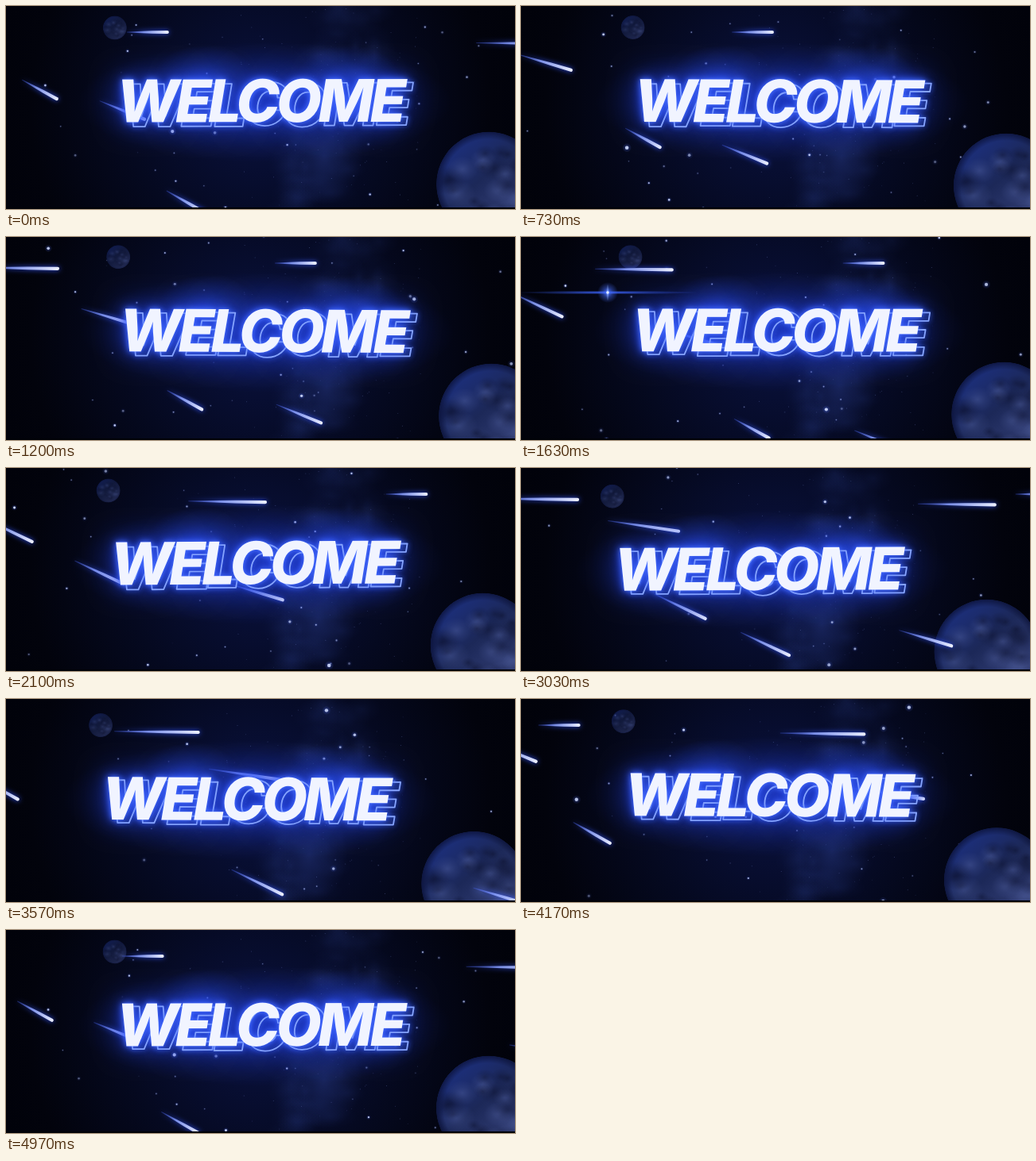
These frames come from a looping animation (640x256 px, 5.01 s). An HTML page with a canvas:

```html
<!DOCTYPE html>
<html lang="en">
<head>
<meta charset="utf-8">
<title>Welcome</title>
<style>
  html, body { margin: 0; width: 100%; height: 100%; overflow: hidden; background: #01020a; }
  canvas { display: block; width: 640px; height: 256px; }
</style>
</head>
<body>
<canvas id="stage" width="640" height="256"></canvas>
<script>
const ctx = document.getElementById('stage').getContext('2d');
const W = 640, H = 256, CX = 320, CY = 128, LOOP = 5.01;
const { sin, cos, min, max, sqrt, exp, floor, PI } = Math;

function seeded(seed) {
  return () => {
    seed = (seed + 0x6D2B79F5) | 0;
    let n = Math.imul(seed ^ (seed >>> 15), seed | 1);
    n ^= n + Math.imul(n ^ (n >>> 7), n | 61);
    return ((n ^ (n >>> 14)) >>> 0) / 4294967296;
  };
}

const wrap = (v, size) => ((v % size) + size) % size;
const rgba = (rgb, a) => `rgba(${rgb},${a})`;

function disc(x, y, r, fill) {
  ctx.fillStyle = fill;
  ctx.beginPath();
  ctx.arc(x, y, r, 0, 2 * PI);
  ctx.fill();
}

function haze(x, y, rx, ry, rgb, a) {
  ctx.save();
  ctx.translate(x, y);
  ctx.scale(1, ry / rx);
  const g = ctx.createRadialGradient(0, 0, 0, 0, 0, rx);
  g.addColorStop(0, rgba(rgb, a));
  g.addColorStop(.5, rgba(rgb, a * .4));
  g.addColorStop(1, rgba(rgb, 0));
  disc(0, 0, rx, g);
  ctx.restore();
}

// Slow hand-held drift: two harmonics of the loop.
function inCamera(t, draw) {
  const a = 2 * PI * t / LOOP;
  const x = -7 + 8 * cos(a) + 9.5 * sin(a) - 2.5 * sin(2 * a) - cos(2 * a);
  const y = 1.2 - 2 * cos(a) - 3.2 * sin(a) + 2.3 * sin(2 * a);
  const turn = .2 * cos(a) - .3 * cos(2 * a);
  ctx.save();
  ctx.translate(CX + x, CY + y);
  ctx.rotate(turn * PI / 180);
  ctx.translate(-CX, -CY);
  draw();
  ctx.restore();
}

function backdrop() {
  const g = ctx.createRadialGradient(CX, CY, 0, CX, CY, 340);
  g.addColorStop(0, '#0a1240');
  g.addColorStop(.5, '#050920');
  g.addColorStop(.85, '#02030c');
  g.addColorStop(1, '#01020a');
  ctx.fillStyle = g;
  ctx.fillRect(0, 0, W, H);
}

// A band of cloud leaning from top right to bottom centre
function nebula() {
  const rnd = seeded(5);
  for (let i = 0; i < 50; i++) {
    const y = rnd() * 270 - 5, x = 445 - y * .25 + (rnd() - .5) * 80;
    haze(x, y, 8 + rnd() * 28, 10 + rnd() * 24, '50,74,165', .1);
  }
  haze(400, 190, 48, 62, '54,78,175', .36);
  for (let i = 0; i < 90; i++)
    disc(410 + (rnd() - .5) * 230, rnd() * H, .5, rgba('140,160,240', .15 + rnd() * .25));
}

// Stars fly outwards, each once per loop as its depth z falls from 1 to 0.
const rnd = seeded(29);
const stars = Array.from({ length: 75 }, () => ({
  dx: (rnd() - .5) * W * .6, dy: (rnd() - .5) * H * .7, phase: rnd(), light: .25 + .75 * rnd()
}));

function drawStars(t) {
  for (const s of stars) {
    const z = 1 - wrap(t / LOOP + s.phase, 1);
    const x = CX + s.dx / z, y = CY + s.dy / z;
    if (x < -5 || x > W + 5 || y < -5 || y > H + 5) continue;
    const a = s.light * min(1, (1 - z) * 3), r = min(2.4, .8 / z) * (.5 + s.light / 2);
    haze(x, y, r * 2.6, r * 2.6, '90,120,255', a * .6);
    disc(x, y, r, rgba('214,224,255', a));
  }
}

function moon(x, y, r, light) {
  const rand = seeded(23);
  ctx.save();
  ctx.globalAlpha = light;
  ctx.beginPath();
  ctx.arc(x, y, r, 0, 2 * PI);
  ctx.clip();
  const g = ctx.createLinearGradient(x - r * .6, y - r * .8, x + r * .6, y + r * .6);
  g.addColorStop(0, '#1c2f7c');
  g.addColorStop(.45, '#1c2858');
  g.addColorStop(1, '#36427a');
  disc(x, y, r, g);
  for (let i = 0; i < 30; i++) {
    const a = rand() * 2 * PI, d = sqrt(rand()) * r * .8, s = r * (.12 + rand() * .25);
    haze(x + cos(a) * d, y + sin(a) * d, s, s * .8, i % 3 ? '12,17,46' : '80,96,160', .45);
  }
  const edge = ctx.createRadialGradient(x, y, r * .86, x, y, r);
  edge.addColorStop(0, 'rgba(10,16,52,0)');
  edge.addColorStop(1, 'rgba(10,16,52,.75)');
  disc(x, y, r, edge);
  ctx.restore();
}

// Meteors enter at the left edge: [time in s, height, speed in px/s]
const meteors = [
  [.42, 62, 208], [.97, 39, 290], [1.37, 76, 204], [1.94, 77, 214], [2.29, 50, 270],
  [2.8, 39, 316], [3.47, 118, 162], [3.69, 33, 155], [4.06, 71, 185], [4.58, 82, 152]
];

// Lower meteors fall more steeply; faster ones leave longer tails.
function drawMeteor([enter, height, speed], t) {
  const x = wrap(t - enter, LOOP) * speed;
  const slope = max(0, min(.57, (height - 38) / 80));
  const len = speed * .34;
  if (x > W + len) return;
  ctx.save();
  ctx.translate(x, height + slope * x);
  ctx.rotate(Math.atan(slope));
  const g = ctx.createLinearGradient(-len, 0, 0, 0);
  g.addColorStop(0, 'rgba(70,100,255,.3)');
  g.addColorStop(.4, 'rgba(140,162,255,.85)');
  g.addColorStop(1, '#eef1ff');
  ctx.fillStyle = g;
  ctx.shadowColor = '#3456ff';
  ctx.shadowBlur = 6;
  ctx.beginPath();
  ctx.moveTo(-len, -.5);
  ctx.lineTo(-len * .4, -1.8);
  ctx.arc(-2, 0, 2.1, -PI / 2, PI / 2);
  ctx.lineTo(-len * .4, 1.8);
  ctx.lineTo(-len, .5);
  ctx.fill();
  ctx.restore();
}

function flare(t) {
  const x = 109, y = 70, a = exp(-(((t - 1.63) / .17) ** 2));
  if (a < .02) return;
  haze(x, y, 115, 2.5, '60,100,255', a);
  haze(x, y, 13, 13, '70,110,255', a);
  haze(x, y, 2, 11, '150,180,255', a);
  disc(x, y, 1.8, rgba('225,234,255', a));
}

function title(t) {
  const word = 'WELCOME', base = 147;
  ctx.font = 'italic 800 74px Inter, Roboto, sans-serif';
  ctx.letterSpacing = '-4.5px';
  ctx.lineJoin = 'round';
  const left = CX - 1 - ctx.measureText(word).width / 2;

  haze(CX + 5, 122, 235, 76, '26,54,205', .55);
  for (const x of [250, 430]) haze(x, 92, 65, 42, '44,84,255', .4);

  ctx.save();
  ctx.fillStyle = ctx.shadowColor = '#2448ff';
  for (const blur of [38, 14]) {
    ctx.shadowBlur = blur;
    ctx.fillText(word, left, base);
  }

  // Loose neon outline behind the letters, redrawn a little differently each time
  ctx.strokeStyle = '#86a4ff';
  ctx.lineWidth = 1.8;
  ctx.shadowColor = '#3c66ff';
  ctx.shadowBlur = 6;
  const r = seeded(40 + floor(t / .133));
  [...word].forEach((letter, i) => {
    const x = left + ctx.measureText(word.slice(0, i)).width;
    ctx.strokeText(letter, x + 8 + (r() - .5) * 3, base + 5 + (r() - .5) * 2.5);
  });

  ctx.shadowColor = '#4c74ff';
  ctx.shadowBlur = 7;
  ctx.fillStyle = '#f1f4ff';
  ctx.fillText(word, left, base);
  ctx.restore();
}

function render(t) {
  backdrop();
  inCamera(t, nebula);
  drawStars(t);
  inCamera(t, () => {
    moon(137, 28, 15, .55);
    moon(607, 226, 66, 1);
  });
  for (const m of meteors) drawMeteor(m, t);
  flare(t);
  inCamera(t, () => title(t));
  ctx.fillStyle = '#010207';
  ctx.fillRect(0, H - 2, W, 2);
}

const start = performance.now();
function tick() {
  render((performance.now() - start) / 1000 % LOOP);
  requestAnimationFrame(tick);
}
tick();
</script>
</body>
</html>
```
